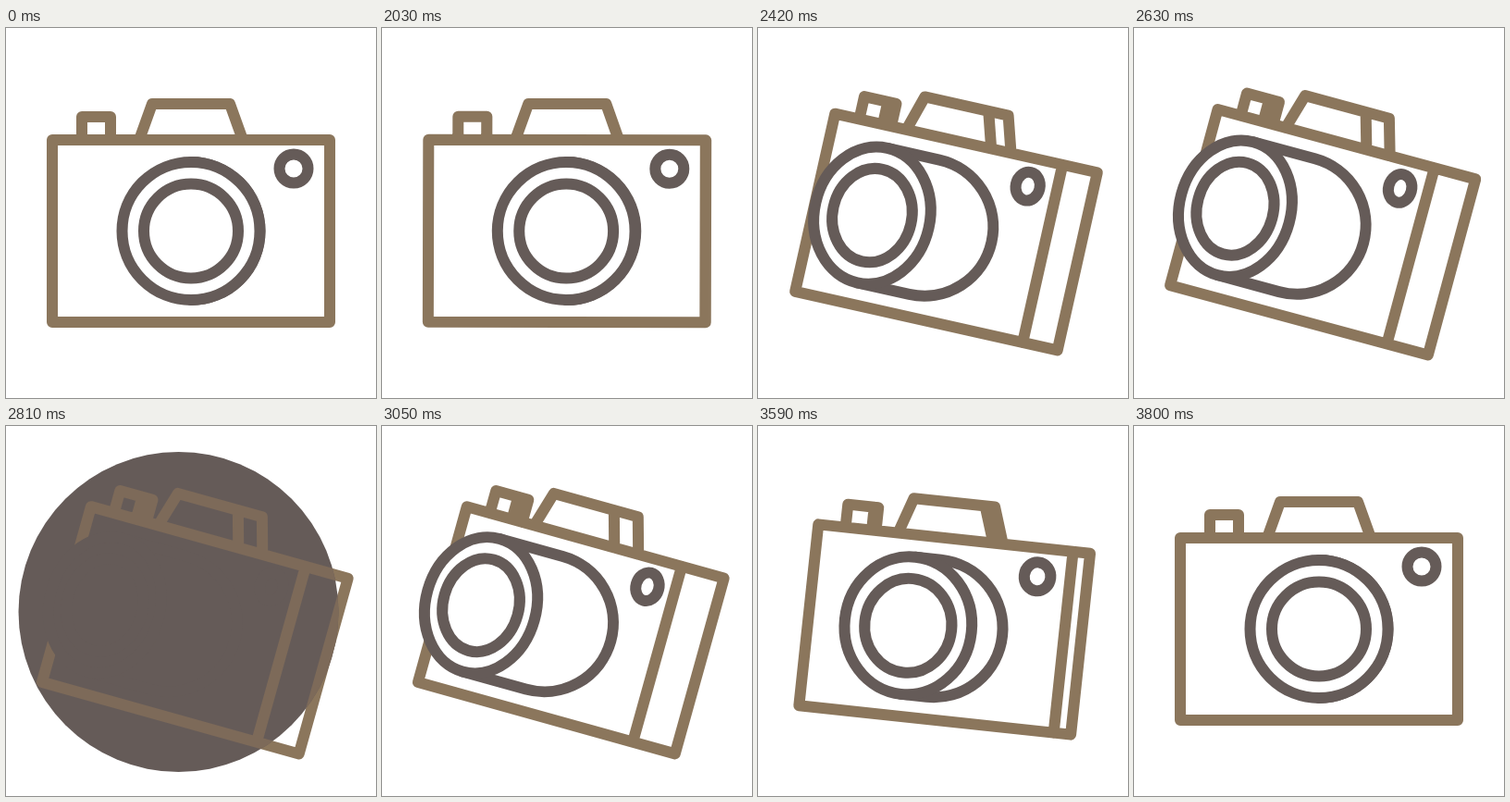
These frames come from a looping animation (400 px wide and 400 px high, 3.83 s). An HTML page with a canvas:

```html
<!DOCTYPE html>
<html lang="en">
<head>
<meta charset="utf-8">
<title>Camera</title>
<style>
html, body { margin: 0; width: 100%; height: 100%; overflow: hidden; background: #fff; }
canvas { display: block; width: 400px; height: 400px; }
</style>
</head>
<body>
<canvas id="stage" width="400" height="400"></canvas>
<script>
const SIZE = 400, LOOP = 3830;
const BROWN = '#8b765c', DARK = '#655b58', SHADED = '#7d6a59', WHITE = '#fff';
const TURN = { start: 2000, back: 3000, length: 800 };
const FLASH = { x: 186.5, y: 201, r: 173, start: 2740, full: 2800, hold: 2820, end: 3000 };
const TILT = 15.6 * Math.PI / 180;

const stage = document.getElementById('stage').getContext('2d');
const layer = document.createElement('canvas');
layer.width = layer.height = SIZE;
const overlay = layer.getContext('2d');

const clamp = v => Math.min(1, Math.max(0, v));

// cubic-bezier(.25, 0, .25, 1)
function ease(x) {
  if (x <= 0 || x >= 1) return clamp(x);
  let lo = 0, hi = 1;
  for (let i = 0; i < 30; i++) {
    const u = (lo + hi) / 2;
    if (0.75 * u * (1 - u) + u ** 3 < x) lo = u; else hi = u;
  }
  return lo * lo * (3 - 2 * lo);
}

const turnAt = t => t < TURN.back
  ? ease((t - TURN.start) / TURN.length)
  : ease(1 - (t - TURN.back) / TURN.length);

function line(c, points, close) {
  points.forEach(([x, y], i) => i ? c.lineTo(x, y) : c.moveTo(x, y));
  if (close) c.closePath();
}

function oval(c, x, y, rx, ry, fill) {
  c.beginPath();
  c.ellipse(x, y, rx, ry, 0, 0, 2 * Math.PI);
  if (fill) {
    c.fillStyle = fill;
    c.fill();
  }
  c.stroke();
}

function drawBody(c, left, squash, p, color) {
  const X = x => left + x * squash;
  const right = X(300), top = -98.5, base = 98.5;
  const side = 47.5 * p, knob = 11.5 * p, hump = 27 * p;
  const kt = top - 25, ht = top - 39;
  c.strokeStyle = color;
  c.beginPath();
  line(c, [[left, top], [right + side, top], [right + side, base], [left, base]], true);
  line(c, [[right, top], [right, base]]);
  line(c, [[X(32), top], [X(32), kt], [X(63) + knob, kt], [X(63) + knob, top]]);
  line(c, [[X(63), kt], [X(63), top]]);
  line(c, [[X(94), top], [X(108), ht], [X(192) + hump, ht], [X(206) + hump, top]]);
  line(c, [[X(192), ht], [X(206), top]]);
  c.stroke();
}

function drawLens(c, left, squash, p, fill) {
  const front = -101.2 * p, back = -30 * p, r = 74.5;
  c.strokeStyle = DARK;
  c.fillStyle = fill;
  oval(c, left + 261 * squash + 1.5 * p, -67.5, 15.5 * squash, 15.5);
  c.beginPath();
  c.moveTo(front, -r);
  c.lineTo(back, -r);
  c.arc(back, 0, r, -Math.PI / 2, Math.PI / 2);
  c.lineTo(front, r);
  c.fill();
  c.stroke();
  oval(c, front, 0, r * squash, r, fill);
  oval(c, front, 0, 51 * squash, 51);
}

function drawCamera(c, p, bodyColor, lensFill) {
  const squash = 1 - 0.197 * p;
  const left = -(300 * squash + 47.5 * p) / 2;
  c.save();
  c.translate(200 + 4.3 * p, 219.5 + 1.3 * p);
  c.rotate(TILT * p);
  c.lineWidth = 12;
  c.lineJoin = c.lineCap = 'round';
  drawBody(c, left, squash, p, bodyColor);
  drawLens(c, left, squash, p, lensFill);
  c.restore();
}

function drawFlash(t, p) {
  if (t < FLASH.start || t >= FLASH.end) return;
  const grow = clamp((t - FLASH.start) / (FLASH.full - FLASH.start));
  const fade = clamp((FLASH.end - t) / (FLASH.end - FLASH.hold));
  const x = 107 + (FLASH.x - 107) * grow;
  const y = 193 + (FLASH.y - 193) * grow;
  overlay.clearRect(0, 0, SIZE, SIZE);
  overlay.save();
  overlay.beginPath();
  overlay.arc(x, y, FLASH.r * grow, 0, 2 * Math.PI);
  overlay.clip();
  overlay.fillStyle = DARK;
  overlay.fillRect(0, 0, SIZE, SIZE);
  drawCamera(overlay, p, SHADED, DARK);
  overlay.restore();
  stage.globalAlpha = fade;
  stage.drawImage(layer, 0, 0);
  stage.globalAlpha = 1;
}

function render(t) {
  const p = turnAt(t);
  stage.fillStyle = WHITE;
  stage.fillRect(0, 0, SIZE, SIZE);
  drawCamera(stage, p, BROWN, WHITE);
  drawFlash(t, p);
}

const begin = performance.now();
function tick() {
  render((performance.now() - begin) % LOOP);
  requestAnimationFrame(tick);
}
tick();
</script>
</body>
</html>
```
